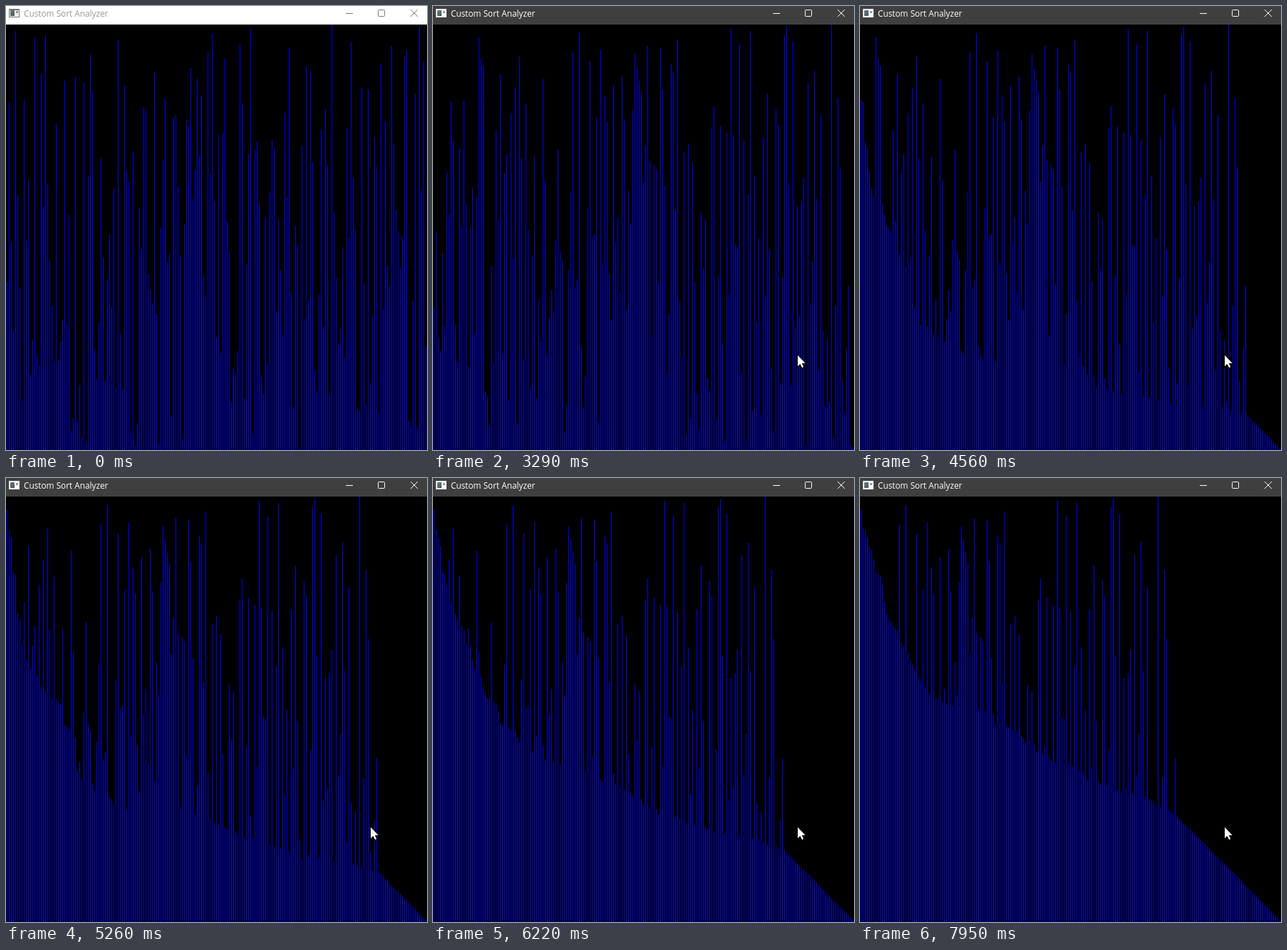
Recreate the animation shown at these times as an HTML page with a canvas. Size 591 by 623 pixels, loop 8000 ms.

```html
<!DOCTYPE html>
<html lang="en">
<head>
<meta charset="utf-8">
<title>Custom Sort Analyzer</title>
<style>
  html, body { margin: 0; width: 100%; height: 100%; overflow: hidden; background: #000; }
  canvas { display: block; }
</style>
</head>
<body>
<canvas id="stage" width="591" height="623"></canvas>
<script>
const ctx = document.getElementById('stage').getContext('2d');
const LOOP = 8000, WIDTH = 591, TOP = 26, BOTTOM = 623;
const BARS = 197, PITCH = 3, UNIT = (BOTTOM - TOP) / BARS;
const SORT_START = 2990, STEP = 68.9;

let seed = 7;
function random() {
  seed = (seed * 1664525 + 1013904223) % 4294967296;
  return seed / 4294967296;
}

// Bar heights are the ranks 1..BARS in random order.
function shuffledBars() {
  const bars = Array.from({ length: BARS }, (_, i) => i + 1);
  for (let i = BARS - 1; i > 0; i--) {
    const j = Math.floor(random() * (i + 1));
    [bars[i], bars[j]] = [bars[j], bars[i]];
  }
  return bars;
}

// One bubble pass: the smallest bar is carried to the right.
function bubblePass(before) {
  const bars = [...before];
  for (let i = 0; i < BARS - 1; i++) {
    if (bars[i] < bars[i + 1]) [bars[i], bars[i + 1]] = [bars[i + 1], bars[i]];
  }
  return bars;
}

// The sort slows down slightly as it goes on.
function passesAt(t) {
  const step = Math.floor((t - SORT_START + 15) / STEP);
  return Math.floor(0.731 * step - 0.00058 * step * step);
}

const opening = shuffledBars(), second = shuffledBars(), third = shuffledBars();
const sorting = [shuffledBars()];
while (sorting.length <= passesAt(LOOP)) sorting.push(bubblePass(sorting.at(-1)));

function barsAt(t) {
  if (t < 1400) return opening;
  if (t < 1610) return second;
  if (t < SORT_START) return third;
  return sorting[passesAt(t)];
}

function drawBars(bars) {
  ctx.fillStyle = '#00f';
  bars.forEach((rank, i) => {
    const y = Math.round(BOTTOM - rank * UNIT);
    ctx.fillRect(1 + i * PITCH, y, 1, BOTTOM - y);
  });
}

function drawIcon(active) {
  ctx.fillStyle = active ? '#f4f4f4' : '#777';
  ctx.fillRect(4, 4, 15, 12);
  ctx.fillStyle = active ? '#fff' : '#f2f2f2';
  ctx.fillRect(5, 6, 13, 9);
  const pane = ctx.createLinearGradient(6, 6, 11, 14);
  pane.addColorStop(0, '#5c7f8c');
  pane.addColorStop(1, '#555');
  ctx.fillStyle = pane;
  ctx.fillRect(6, 6, 6, 8);
  ctx.fillStyle = '#8899a8';
  ctx.fillRect(14, 7, 3, 3);
}

function drawTitleBar(active) {
  ctx.fillStyle = active ? '#3f3f3f' : '#fff';
  ctx.fillRect(0, 0, WIDTH, TOP);
  drawIcon(active);

  ctx.fillStyle = active ? '#fff' : '#999';
  ctx.font = '11.8px "Open Sans", "Noto Sans", sans-serif';
  ctx.fillText('Custom Sort Analyzer', 25, 15);

  ctx.strokeStyle = active ? '#fff' : '#777';
  ctx.lineWidth = 1;
  ctx.beginPath();
  ctx.moveTo(477, 10.5);
  ctx.lineTo(487, 10.5);
  ctx.roundRect(522.5, 5.5, 9, 9, 1);
  ctx.moveTo(568, 5);
  ctx.lineTo(578, 15);
  ctx.moveTo(578, 5);
  ctx.lineTo(568, 15);
  ctx.stroke();
}

const arrow = new Path2D('M0 0V15.5L3.5 12.2L6 17.5L8.2 16.5L5.8 11.2H10.7Z');

function drawCursor(t) {
  if (t < 130) return;
  const [x, y] = t < 200 ? [515, 495] : t < 930 ? [514, 490] : t < 1000 ? [513, 490] : [512, 490];
  ctx.save();
  ctx.translate(x, y);
  ctx.strokeStyle = '#000';
  ctx.lineWidth = 2;
  ctx.stroke(arrow);
  ctx.fillStyle = '#fff';
  ctx.fill(arrow);
  ctx.restore();
}

function draw(t) {
  ctx.fillStyle = '#000';
  ctx.fillRect(0, 0, WIDTH, BOTTOM);
  drawBars(barsAt(t));
  drawTitleBar(t >= 1150);
  drawCursor(t);
}

const begin = performance.now();
function tick() {
  draw((performance.now() - begin) % LOOP);
  requestAnimationFrame(tick);
}
tick();
</script>
</body>
</html>
```
